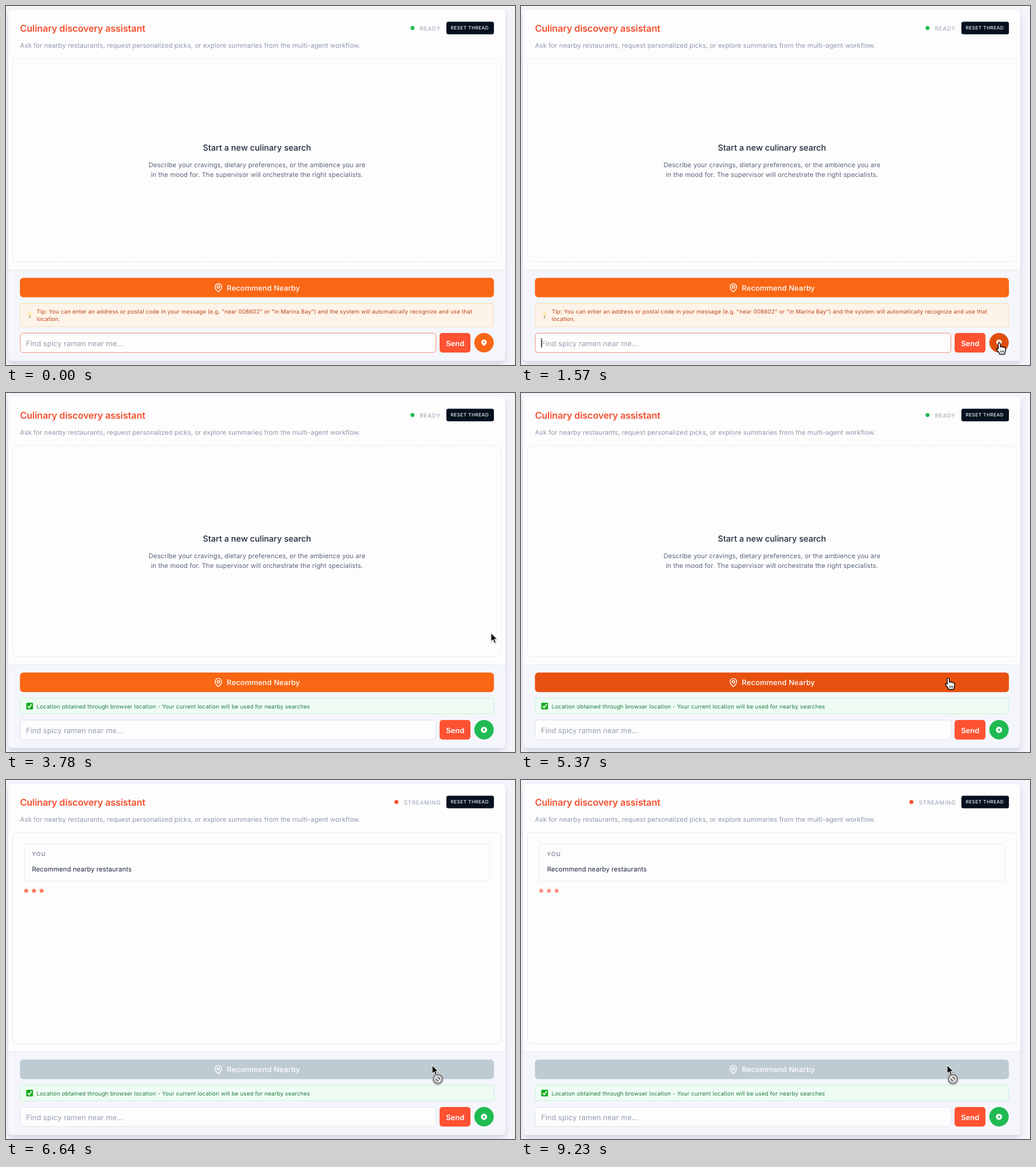
Recreate the animation shown at these times as an HTML page. Size 891 px wide and 628 px high, loop 9.33 s.

```html
<!DOCTYPE html>
<html lang="en">
<head>
<meta charset="utf-8">
<title>Culinary discovery assistant</title>
<style>
  html, body { margin: 0; width: 100%; height: 100%; overflow: hidden; background: #f4f5fb; }
  svg { display: block; width: 100%; height: 100%; font-family: Inter, "Open Sans", sans-serif; text-rendering: geometricPrecision; }
  .card { filter: drop-shadow(0 5px 5px rgba(40, 50, 90, .17)); }
  .body { font-size: 11.45px; letter-spacing: .068px; }
  .small { font-size: 9.8px; letter-spacing: .165px; }
  .base { font-size: 12.92px; letter-spacing: .04px; }
  .caps { font-size: 9.8px; letter-spacing: .8px; }
  .mid { text-anchor: middle; }
  .medium { font-weight: 500; }
  .bold { font-weight: 600; }
</style>
</head>
<body>
<svg viewBox="0 0 891 628" xmlns="http://www.w3.org/2000/svg">
  <rect width="891" height="628" fill="#f4f5fb"/>
  <rect class="card" x="4" y="6.5" width="870" height="614.5" rx="7" fill="#fdfdfd"/>

  <text x="24.4" y="45" font-size="16.4" font-weight="560" letter-spacing="-.19" fill="#f5502f">Culinary discovery assistant</text>
  <text class="body" x="24.6" y="73.4" fill="#8e99ac">Ask for nearby restaurants, request personalized picks, or explore summaries from the multi-agent workflow.</text>
  <circle id="dot" cy="38.6" r="3.5"/>
  <text id="status" class="caps" y="42.5" fill="#94a0b4"></text>
  <rect x="770.9" y="27.4" width="83.2" height="22.2" rx="3.5" fill="#06101f"/>
  <text class="medium" x="778.4" y="41.4" font-size="8.2" letter-spacing=".45" fill="#f1f3f6">RESET THREAD</text>

  <rect id="panel" x="11.5" y="92" width="855.5" rx="7" fill="none" stroke="#e1e6f0"/>
  <g id="empty">
    <text class="mid" x="439.3" y="253" font-size="14.6" font-weight="480" letter-spacing="-.02" fill="#1e293b">Start a new culinary search</text>
    <g class="mid body" fill="#5b677b">
      <text x="439.3" y="282.4">Describe your cravings, dietary preferences, or the ambience you are</text>
      <text x="439.3" y="299.4">in the mood for. The supervisor will orchestrate the right specialists.</text>
    </g>
  </g>
  <g id="chat">
    <rect x="32" y="112.5" width="814.5" height="64.5" rx="4" fill="#fdfdfe" stroke="#e4eaf0"/>
    <text class="caps" x="45.6" y="133.4" style="letter-spacing:1.2px" fill="#5a667c">YOU</text>
    <text class="body" x="45.4" y="160.3" fill="#1e293b">Recommend nearby restaurants</text>
    <g id="typing" fill="#fd5133">
      <circle cx="35.4" cy="193.7" r="3.5"/><circle cx="48.9" cy="193.7" r="3.5"/><circle cx="62.4" cy="193.7" r="3.5"/>
    </g>
  </g>

  <path id="footer" fill="#f4f6fb"/>
  <path id="rule" stroke="#e3e8f0"/>
  <g id="nearby">
    <rect id="nearbyBg" x="24.4" y="475.4" width="829.7" height="34.2" rx="6"/>
    <g transform="translate(363.2 484.3) scale(.708)" fill="none" stroke="#fff" stroke-width="2">
      <path d="M20 10c0 6-8 12-8 12s-8-6-8-12a8 8 0 0 1 16 0Z"/><circle cx="12" cy="10" r="3"/>
    </g>
    <text class="base medium" x="386.6" y="497.6" style="letter-spacing:.14px" fill="#fff">Recommend Nearby</text>
  </g>

  <g id="tip">
    <rect x="25" y="520" width="828.5" height="41" rx="3" fill="#fdf3e8" stroke="#fbdcae"/>
    <circle cx="41.5" cy="539" r="3.4" fill="#fcecb4"/>
    <path d="M40.5 538.5v3.5M42.5 538.5v3.5" stroke="#ecd080" stroke-width=".6"/>
    <rect x="40.1" y="542.4" width="2.8" height="3.6" rx="1" fill="#a9a9a2"/>
    <g class="small" fill="#c0451a">
      <text x="53.8" y="537.8">Tip: You can enter an address or postal code in your message (e.g. "near 008602" or "in Marina Bay") and the system will automatically recognize and use that</text>
      <text x="53.8" y="551.4">location.</text>
    </g>
  </g>
  <g id="found">
    <rect x="25" y="534" width="828.5" height="27" rx="3" fill="#eefcf3" stroke="#c4f3d5"/>
    <rect x="35.5" y="541.8" width="11.8" height="11.8" rx="1.6" fill="#14ab1c"/>
    <path d="M38.2 547.8l2.5 2.8 4.2-6.4" fill="none" stroke="#fff" stroke-width="1.8"/>
    <text class="small" x="53.6" y="551.5" fill="#1f7a41">Location obtained through browser location - Your current location will be used for nearby searches</text>
  </g>

  <rect id="input" x="25" y="572.2" width="727.5" height="34" rx="5" fill="#fdfdfd"/>
  <text class="base" x="35" y="594.5" fill="#949fb0">Find spicy ramen near me...</text>
  <rect id="caret" x="35.2" y="581" width="1.2" height="17" fill="#111"/>
  <rect x="759" y="572" width="54" height="34.3" rx="5" fill="#ff5232"/>
  <text class="base bold mid" x="786.2" y="594.5" fill="#fff">Send</text>

  <circle id="locate" cx="836.8" cy="589" r="17"/>
  <path id="pin" transform="translate(830 582.1) scale(.68)" fill="#fff" fill-rule="evenodd"
    d="M5.05 4.05a7 7 0 1 1 9.9 9.9L10 18.9l-4.95-4.95a7 7 0 0 1 0-9.9zM10 11a2 2 0 1 0 0-4 2 2 0 0 0 0 4z"/>
  <g id="clear">
    <circle cx="836.8" cy="589.2" r="5.4" fill="#fff"/>
    <path d="M835.1 587.5l3.4 3.4m0-3.4l-3.4 3.4" stroke="#20ba53" stroke-width="1.4"/>
  </g>

  <g id="cursor" style="filter:drop-shadow(0 1px 1px rgba(0,0,0,.3))">
    <path id="arrow" d="M0 0V15.5L3.6 12.2 6 18l2.7-1.1L6.2 11.3H11z" fill="#000" stroke="#fff" stroke-width="1.1"/>
    <g id="hand" stroke="#000" stroke-width="1.3" stroke-linejoin="round">
      <path fill="#fff" d="M-1.8 10.5V1.6a1.8 1.8 0 0 1 3.6 0V7.2c.3-1.5 3.2-1.4 3.3.4.5-1.3 3-1 3 .6.6-1 2.6-.7 2.6 1V13.5c0 2.5-1.3 3.5-1.6 5.8H.6C0 16.5-3 13.8-4.8 11.2c-1.2-1.8 1-3 3-.7z"/>
      <path d="M2.6 13v3.6M5 13v3.6M7.4 13v3.6" stroke-width="1"/>
    </g>
    <g id="blocked" transform="translate(10 24.6)" fill="none" stroke="#fff">
      <circle r="8.9" fill="#858585" stroke="#a5a5a5" stroke-width=".8"/>
      <circle r="5.3" stroke-width="1.7"/><path d="M-3.7-3.7l7.4 7.4" stroke-width="1.7"/>
    </g>
  </g>
</svg>
<script>
const LOOP = 9330, CLICK = 2000, FOUND = 2500, ASK = 6275;
const ORANGE = [249, 102, 20], DARK = [232, 80, 15], GREY = [190, 203, 211];
const GREEN = [32, 186, 83], DARK_GREEN = [24, 160, 70];
const el = id => document.getElementById(id);
const set = (id, attrs) => { for (const k in attrs) el(id).setAttribute(k, attrs[k]); };
const show = (id, on) => { el(id).style.display = on ? "" : "none"; };
const clamp = v => Math.max(0, Math.min(1, v));
const smooth = v => v * v * (3 - 2 * v);
const fade = (t, start) => smooth(clamp((t - start) / 150));
const mix = (a, b, k) => `rgb(${a.map((v, i) => Math.round(v + (b[i] - v) * k))})`;

// pointer stops: time, x, y
const stops = [
  [400, 900, 500], [980, 837.3, 589.5], [2950, 837.3, 589.5], [3600, 849, 419.5],
  [4440, 849, 419.5], [5250, 748, 499], [6180, 748, 499], [6270, 746, 498.5]
];

function pointer(t) {
  let i = stops.findIndex(s => s[0] > t);
  if (i < 0) i = stops.length;
  if (!i) return stops[0].slice(1);
  const a = stops[i - 1], b = stops[i] || a;
  const k = b === a ? 0 : smooth((t - a[0]) / (b[0] - a[0]));
  return [a[1] + (b[1] - a[1]) * k, a[2] + (b[2] - a[2]) * k];
}

function draw(t) {
  const found = t >= FOUND, busy = t >= ASK, shift = found ? 13.7 : 0;
  const top = 461.7 + shift;

  set("dot", { cx: busy ? 683.4 : 711.6, fill: busy ? "#f5502f" : "#20bb50" });
  set("status", { x: busy ? 696.5 : 724.5 });
  el("status").textContent = busy ? "STREAMING" : "READY";

  set("panel", { height: 355.6 + shift, "stroke-dasharray": busy ? "none" : "2.2 1.4" });
  show("empty", !busy);
  set("empty", { transform: `translate(0 ${shift / 2})` });
  show("chat", busy);
  const wave = (1 - Math.cos((t - ASK) / 1200 * 2 * Math.PI)) / 2;
  set("typing", { opacity: 1 - .4 * wave });

  set("footer", { d: `M4 ${top}H874V614a7 7 0 0 1-7 7H11a7 7 0 0 1-7-7z` });
  set("rule", { d: `M4 ${top}H874` });
  set("nearby", { transform: `translate(0 ${shift})` });
  show("tip", !found);
  show("found", found);

  const [x, y] = pointer(t);
  const overPin = Math.hypot(x - 836.8, y - 589) < 17;
  const overNearby = t > 4440 && y > 489.3;
  set("nearbyBg", { fill: busy ? mix(DARK, GREY, fade(t, ASK)) : mix(ORANGE, DARK, fade(t, 5080)) });

  const hover = fade(t, 850) - fade(t, 3090);
  set("locate", { fill: found ? mix(GREEN, DARK_GREEN, hover) : mix(ORANGE, [224, 78, 14], hover) });
  show("pin", !found);
  show("clear", found);

  set("input", { stroke: t < CLICK ? "#f58c6c" : "#dde3ec" });
  show("caret", t < CLICK && t % 1060 >= 500);

  const hand = !busy && (overPin || overNearby);
  set("cursor", { transform: `translate(${x} ${y})` });
  show("cursor", t >= 400);
  show("hand", hand);
  show("arrow", !hand);
  show("blocked", busy);
}

const start = performance.now();
function tick() {
  draw((performance.now() - start) % LOOP);
  requestAnimationFrame(tick);
}
tick();
</script>
</body>
</html>
```
